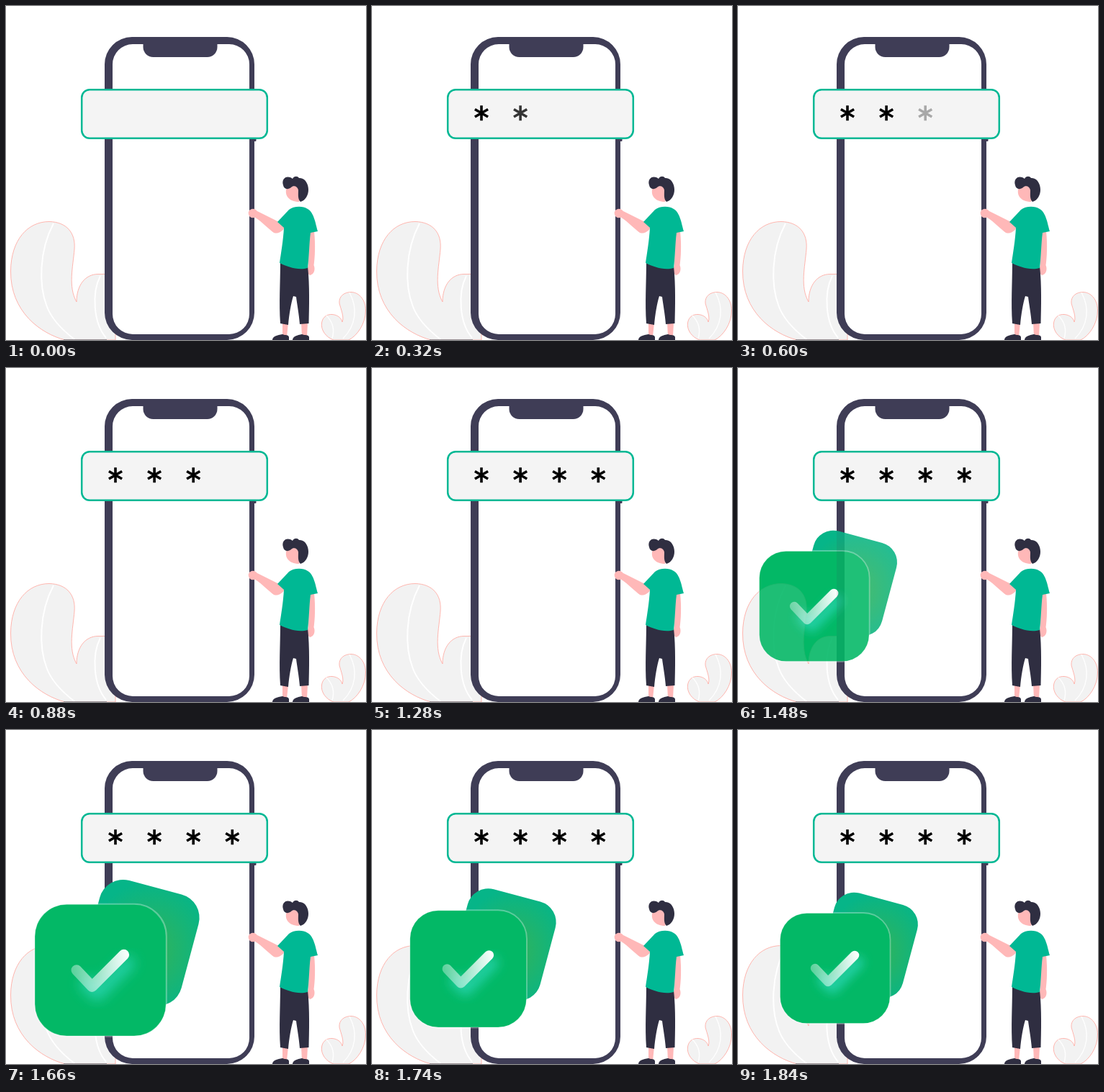
An HTML page that plays this animation: 500 px wide and 464 px high, repeating every 2.06 s.

```html
<!DOCTYPE html>
<html lang="en">
<head>
<meta charset="utf-8">
<title>Passcode confirmed</title>
<style>
  html, body { margin: 0; width: 100%; height: 100%; overflow: hidden; background: #fff; }
  svg { display: block; width: 500px; height: 464px; }
  .vein { fill: none; stroke: #fff; stroke-width: 2; }
  .leaf { fill: #f2f2f2; stroke: #ffaea6; stroke-width: .9; }
  .dark { fill: #2f2e41; }
  .skin { fill: #ffb8b8; }
  .mint { fill: #00b894; }
</style>
</head>
<body>
<svg viewBox="0 0 500 464">
  <defs>
    <radialGradient id="backFill" cx=".6" cy=".55" r=".62">
      <stop offset=".1" stop-color="#2fb35c"/>
      <stop offset="1" stop-color="#06b588"/>
    </radialGradient>
    <linearGradient id="tickFill" gradientUnits="userSpaceOnUse" x1="168" y1="312" x2="100" y2="338">
      <stop offset="0" stop-color="#fff"/>
      <stop offset="1" stop-color="#fff" stop-opacity=".32"/>
    </linearGradient>
    <filter id="blur" x="-50%" y="-50%" width="200%" height="200%">
      <feGaussianBlur stdDeviation="7"/>
    </filter>
    <clipPath id="lowerLeft"><rect y="190" width="300" height="274"/></clipPath>

    <g id="bigLeaf">
      <path class="leaf" d="M82 464C48 455 6 425 6.500 368C7 325 30 299.500 60 299.500C84 300 97 315 95 338C93 362 86 390 98 411C98 388 110 372.500 128 372.500H152V464Z"/>
      <path class="vein" d="M66 302C46 340 45 388 57 418C64 436 78 450 95 463M131 375C119 398 121 440 139 461"/>
    </g>
    <g id="phone">
      <rect x="140" y="46" width="202" height="415" rx="35" fill="#fff"/>
      <path fill="#3f3d56" fill-rule="evenodd" d="M175 43H307A38 38 0 0 1 345 81V426A38 38 0 0 1 307 464H175A38 38 0 0 1 137 426V81A38 38 0 0 1 175 43ZM176 53A28 28 0 0 0 148 81V428A28 28 0 0 0 176 456H310A28 28 0 0 0 338 428V81A28 28 0 0 0 310 53Z"/>
    </g>
    <path id="star" d="M0-10.500V10.500M-9.100-5.250L9.100 5.250M-9.100 5.250L9.100-5.250" stroke="#000" stroke-width="3.600"/>
  </defs>

  <use href="#bigLeaf"/>
  <path d="M80 463.600H140M455 463.600H477" stroke="#77767f" stroke-width=".8"/>
  <path class="leaf" d="M455 464C444 460 437 450 438.500 440C440 431 447 428 453 428.500C461 429 466 434 467 439C470 432 465 421 463 413C462 403 470 397.500 479 397.500C491 397.500 499.500 409 499.500 423C499.500 441 488 458 476 464Z"/>
  <path class="vein" style="stroke-width:1.300" d="M477 398C489 420 486 444 468 462M445 430C455 440 456 452 453 462"/>

  <rect x="344" y="148" width="3.500" height="40" rx="1" fill="#3f3d56"/>
  <use href="#phone"/>
  <path fill="#3f3d56" d="M190.500 50H293.500V57A14 14 0 0 1 279.500 71H204.500A14 14 0 0 1 190.500 57Z"/>

  <!-- person -->
  <path class="skin" d="M384 440H392L390 459H384ZM410 440H419L418 459H411Z"/>
  <path class="dark" d="M370 464C370 459 377 457 384 456C388 458 392 456 393 460V464ZM398 464C398 459 405 457 411 456C415 458 420 456 421 460V464Z"/>
  <path class="skin" d="M421 314L428 313C430 332 429 350 427.500 360C430 366 428 373 422 374C418 372 419 365 420 358Z"/>
  <path class="dark" d="M381 355C392 360 406 364 419 361C422 388 421 420 420.500 441L408 442C407 428 404 413 403 404L399 403C396 412 393 430 392 443L381 441C379 412 381 385 381 355Z"/>
  <circle class="skin" cx="343" cy="288" r="6.300"/>
  <path class="skin" d="M347 284L379 300L387 308C383 314 377 317 372 315C365 310 357 301 345 293Z"/>
  <path class="mint" d="M377 300L393 283C399 278 412 277 419 282C428 287 430 303 433 313L423 315C421 330 421 350 419 364C406 368 390 362 380 357C382 343 385 326 386 308Z"/>
  <path class="skin" d="M390 252C386 262 392 272 407 272L411 262L406 249Z"/>
  <path class="dark" d="M385 249C382 240 390 234 398 240C400 236 405 236 407 239C415 238 420 247 420 255C420 263 416 270 409 272C405 268 406 262 406 256C405 250 399 249 396 252C391 256 386 254 385 249Z"/>

  <!-- passcode field -->
  <rect x="105.200" y="116.200" width="257.600" height="67.600" rx="11" fill="#f4f4f4" stroke="#00b894" stroke-width="2.500"/>
  <g id="stars"></g>

  <g id="cards">
    <rect x="122" y="232.500" width="119" height="133" rx="28" transform="rotate(15 181.500 299)" fill="url(#backFill)"/>
    <rect x="58.500" y="254.500" width="152.500" height="153" rx="37" fill="#03b866"/>
    <rect x="58" y="254" width="153.500" height="154" rx="37.500" fill="none" stroke="#fff" stroke-opacity=".3" stroke-width="1.800"/>
    <path d="M119 347L131 358L166 323" fill="none" stroke="#2ad6b4" stroke-width="17" stroke-linecap="round" stroke-linejoin="round" opacity=".8" filter="url(#blur)"/>
    <path d="M107 331L125 350L162 313" fill="none" stroke="url(#tickFill)" stroke-width="12.500" stroke-linecap="round" stroke-linejoin="round"/>
  </g>
  <!-- scenery that still shows through while the cards fade in -->
  <g id="veil" clip-path="url(#lowerLeft)"><use href="#bigLeaf"/><use href="#phone"/></g>
</svg>

<script>
  const LOOP = 2060, STEP = 20, FADE = 300;
  const STAR_STARTS = [0, 160, 550, 950];
  const SLIDE_AT = 1280, SLIDE_FROM = -260;
  const GROW_AT = 1598, PEAK_AT = 1640, SETTLED_AT = 1840, PEAK = 0.24;
  const CENTRE = [153.5, 317];

  const byId = id => document.getElementById(id);
  const cards = byId('cards'), veil = byId('veil');
  const progress = (t, from, to) => Math.min(1, Math.max(0, (t - from) / (to - from)));
  const easeOut = p => 1 - (1 - p) ** 2;

  const stars = STAR_STARTS.map((start, i) => {
    const star = document.createElementNS('http://www.w3.org/2000/svg', 'use');
    star.setAttribute('href', '#star');
    star.setAttribute('transform', `translate(${152 + i * 54.1} 148.7)`);
    return byId('stars').appendChild(star);
  });

  function render(t) {
    stars.forEach((star, i) => {
      const start = STAR_STARTS[i];
      star.setAttribute('opacity', easeOut(progress(t, start, start + FADE)));
    });

    const entering = t > SLIDE_AT;
    const remaining = 1 - easeOut(progress(t, SLIDE_AT, SLIDE_AT + FADE));
    const swell = t < PEAK_AT
      ? progress(t, GROW_AT, PEAK_AT)
      : 1 - easeOut(progress(t, PEAK_AT, SETTLED_AT));
    const [cx, cy] = CENTRE;
    cards.setAttribute('visibility', entering ? 'visible' : 'hidden');
    cards.setAttribute('transform',
      `translate(${cx + SLIDE_FROM * remaining} ${cy}) scale(${1 + PEAK * swell}) translate(${-cx} ${-cy})`);
    veil.setAttribute('opacity', entering ? remaining : 0);
  }

  const began = performance.now();
  function tick() {
    const t = (performance.now() - began) % LOOP;
    render(Math.floor(t / STEP) * STEP);
    requestAnimationFrame(tick);
  }
  render(0);
  requestAnimationFrame(tick);
</script>
</body>
</html>
```
